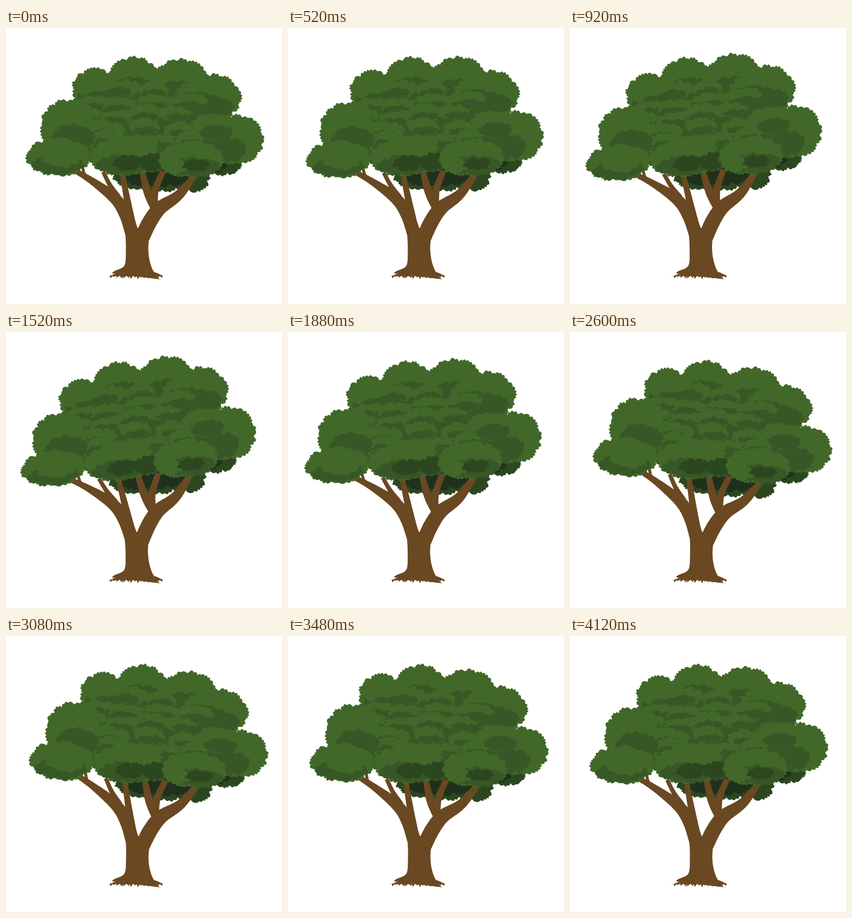
Write an HTML page with a canvas that moves like this. It is 480 px wide and 480 px high and loops after 4200 ms.

```html
<!DOCTYPE html>
<html lang="en">
<head>
<meta charset="utf-8">
<title>Swaying tree</title>
<style>
  html, body { margin: 0; width: 100%; height: 100%; overflow: hidden; background: #fff; }
  canvas { display: block; width: 480px; height: 480px; }
</style>
</head>
<body>
<canvas id="stage" width="480" height="480"></canvas>
<script>
const ctx = document.getElementById('stage').getContext('2d');
const LOOP = 4200, STEP = 40, LAST = 4120;
const ROOT = { x: 228, y: 437 };
const LIGHT = '#416829', MID = '#385726', SHADE = '#2c4720', DEEP = '#1f311c', BARK = '#694822';

let seed = 11;
const random = () => (seed = (seed * 16807) % 2147483647) / 2147483647;
const spread = (low, high) => low + random() * (high - low);

const shapes = [];
const add = (color, pts) => shapes.push({ color, pts });

// Ellipse with a leafy edge: broad lumps carrying small scallops
function leaves(color, x, y, rx, ry) {
  const around = Math.PI * (rx + ry), steps = Math.ceil(around / 1.2);
  const lumps = Math.round(around / 28), tips = Math.round(around / 7.5);
  const shift = spread(0, 6), wave = spread(0, 6);
  const pts = Array.from({ length: steps }, (_, i) => {
    const a = 2 * Math.PI * i / steps;
    const lump = Math.abs(Math.sin(lumps * a / 2 + Math.sin(3 * a + wave) + shift));
    const tip = Math.abs(Math.sin(tips * a / 2 + 1.5 * Math.sin(5 * a + shift) + wave));
    const push = 4 * lump + 2.8 * tip - 4.6;
    return [x + (rx + push) * Math.cos(a), y + (ry + push) * Math.sin(a)];
  });
  add(color, pts);
}

// Sunlit clump with a darker belly
function clump(x, y, rx, ry, lean = 0) {
  leaves(LIGHT, x, y, rx, ry);
  leaves(MID, x + lean, y + ry * 0.42, rx * 0.8, ry * 0.52);
}

// Limb along a Catmull-Rom curve through [x, y, half width]
function limb(...keys) {
  const left = [], right = [], last = keys.length - 1;
  const at = i => keys[Math.max(0, Math.min(last, i))];
  const point = u => {
    const i = Math.min(last - 1, Math.floor(u)), t = u - i;
    const [a, b, c, d] = [at(i - 1), at(i), at(i + 1), at(i + 2)];
    return b.map((v, n) => v + t / 2 * (c[n] - a[n]
      + t * (2 * a[n] - 5 * v + 4 * c[n] - d[n] + t * (3 * (v - c[n]) + d[n] - a[n]))));
  };
  for (let i = 0; i <= last * 12; i++) {
    const u = i / 12, [x, y, w] = point(u);
    const [ax, ay] = point(Math.max(0, u - 0.02)), [bx, by] = point(Math.min(last, u + 0.02));
    const len = Math.hypot(bx - ax, by - ay);
    const nx = (by - ay) / len * w, ny = (ax - bx) / len * w;
    left.push([x + nx, y + ny]);
    right.unshift([x - nx, y - ny]);
  }
  add(BARK, [...left, ...right]);
}

function roots() {
  const pts = [[196, 425], [260, 425]];
  for (let x = 273; x >= 180; x -= 5.8) {
    pts.push([x, 431], [x - spread(1, 6), 433 + 5 * Math.sqrt(1 - ((x - 227) / 50) ** 2) * random()]);
  }
  add(BARK, pts);
}

function backLeaves() {
  leaves(SHADE, 262, 258, 76, 27);
  leaves(SHADE, 322, 262, 32, 23);
  leaves(SHADE, 378, 238, 33, 18);
  leaves(DEEP, 264, 256, 66, 20);
  leaves(DEEP, 366, 239, 19, 11);
}

function wood() {
  roots();
  limb([227, 432, 43], [229, 415, 24], [228, 385, 19.5], [229, 348, 22]);
  limb([219, 356, 12], [208, 325, 11], [190, 297, 10], [148, 265, 6], [114, 245, 4]);
  limb([223, 354, 6], [213, 310, 6], [203, 256, 4.5]);
  limb([194, 294, 6], [180, 272, 4], [169, 250, 3.5]);
  limb([143, 264, 4], [136, 253, 2.5], [132, 236, 3]);
  limb([237, 364, 13], [250, 337, 13], [268, 313, 12], [302, 289, 8.5], [335, 246, 4]);
  limb([260, 312, 9], [246, 285, 7], [236, 245, 4.5]);
  limb([256, 306, 8], [260, 280, 6], [273, 249, 5]);
}

function crown() {
  leaves(MID, 240, 170, 150, 80);
  clump(358, 121, 51, 41, -4);
  clump(156, 106, 41, 36);
  clump(304, 96, 51, 42, -6);
  clump(222, 88, 43, 38);
  for (let y = 110; y < 200; y += 21) {
    const half = 82 + (y - 110) * 0.5;
    for (let x = 240 - half; x <= 240 + half; x += 54) {
      clump(x + spread(-12, 12), y + spread(-6, 6), spread(25, 38), spread(12, 17), spread(-9, 9));
    }
  }
  clump(108, 172, 48, 48, 8);
  clump(401, 194, 47, 43, -20);
  clump(360, 172, 38, 24, 6);
  clump(91, 224, 56, 33);
  leaves(LIGHT, 97, 225, 34, 17);
  clump(205, 224, 60, 33);
  leaves(SHADE, 212, 234, 28, 13);
  leaves(SHADE, 256, 234, 24, 16);
  clump(322, 228, 56, 32, 6);
  leaves(LIGHT, 293, 240, 22, 14);
  leaves(SHADE, 330, 238, 24, 10);
}

backLeaves();
wood();
crown();

// Lean is a curvature: the bend grows with the height above the root
function bend([x, y], k) {
  const angle = k * (ROOT.y - y), side = x - ROOT.x;
  const c = Math.cos(angle), s = Math.sin(angle);
  return [ROOT.x - (1 - c) / k + side * c, ROOT.y - s / k - side * s];
}

const sway = [[0, 0], [1390, 0.00045], [2790, -0.00028], [LOOP, 0]];
function lean(time) {
  const i = sway.findIndex(key => time < key[0]);
  const [t0, a] = sway[i - 1], [t1, b] = sway[i];
  const ease = (1 - Math.cos(Math.PI * (time - t0) / (t1 - t0))) / 2;
  return a + (b - a) * ease || 1e-7;
}

function draw(time) {
  const k = lean(time);
  ctx.fillStyle = '#fff';
  ctx.fillRect(0, 0, 480, 480);
  for (const { color, pts } of shapes) {
    ctx.beginPath();
    for (const p of pts) ctx.lineTo(...bend(p, k));
    ctx.fillStyle = color;
    ctx.fill();
  }
}

const start = performance.now();
let shown = -1;
function tick() {
  const elapsed = (performance.now() - start) % LOOP;
  const time = Math.min(LAST, Math.floor(elapsed / STEP) * STEP);
  if (time !== shown) draw(shown = time);
  requestAnimationFrame(tick);
}
tick();
</script>
</body>
</html>
```
